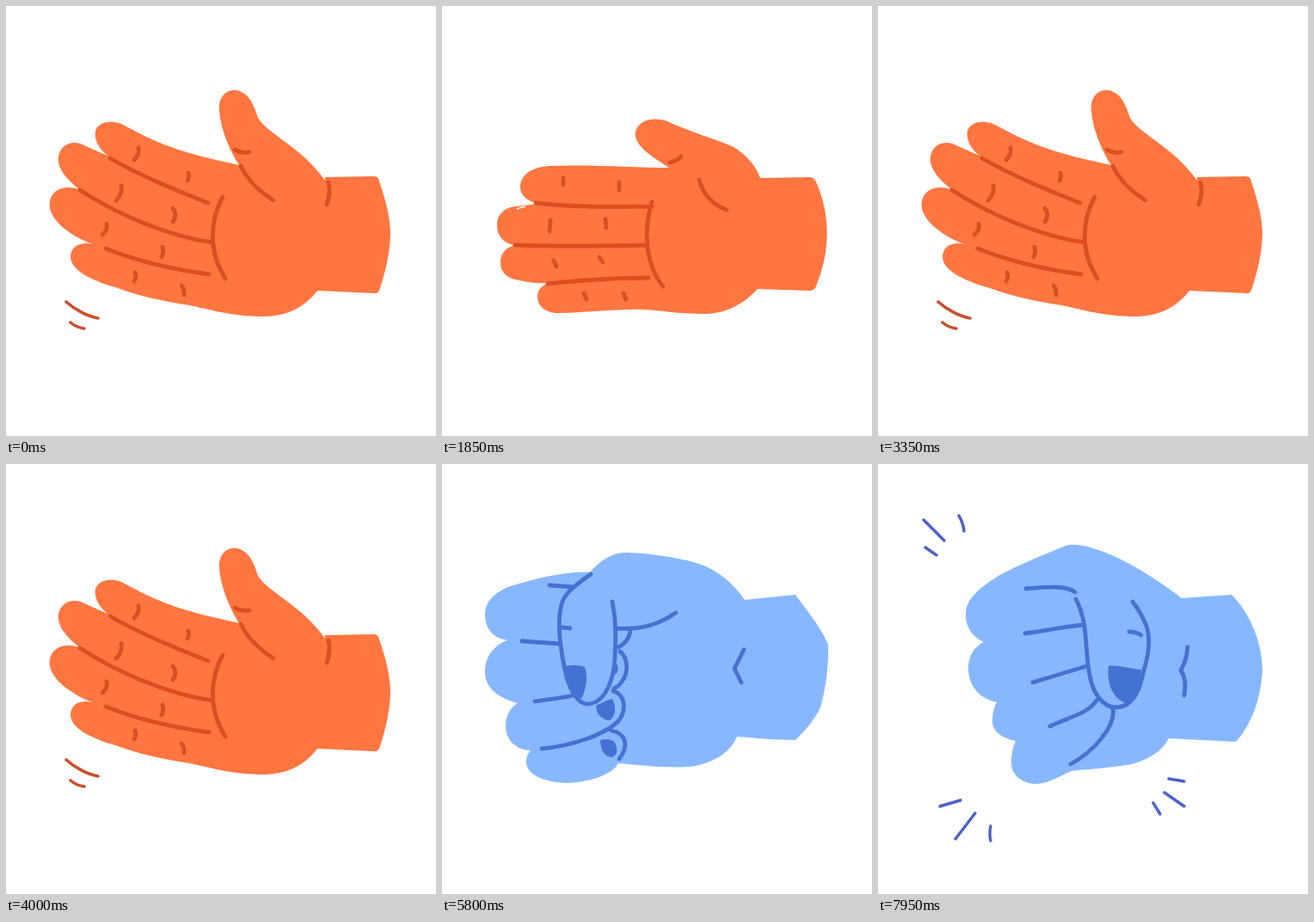
Write an HTML page that moves like this. It is 500 px wide and 500 px high and loops after 8 s.

```html
<!DOCTYPE html>
<html lang="en">
<head>
<meta charset="utf-8">
<title>Hand gestures</title>
<style>
  html, body { margin: 0; width: 100%; height: 100%; overflow: hidden; background: #fff; }
  svg { display: block; width: 100%; height: 100%; }
  g { display: none; }
  .line { fill: none; stroke-width: 4.8; stroke-linecap: round; stroke-linejoin: round; }
  .orange .skin { fill: #ff7640; }
  .orange .line { stroke: #dc4e20; }
  .orange .mark { stroke: #c94f2c; stroke-width: 3.6; }
  .blue .skin { fill: #87b8ff; }
  .blue .line { stroke: #4472d3; }
  .blue .nail { fill: #4472d3; }
  .blue .mark { stroke: #4b63c9; stroke-width: 3.4; }
  .glint { fill: none; stroke: #fff; stroke-width: 1.6; }
</style>
</head>
<body>
<svg viewBox="0 0 500 500">
  <g id="raised" class="orange">
    <path class="skin" d="M371 199L428 198Q433 198 434 204C441 225 447 245 447 266C446 292 440 312 435 328Q433 335 428 334L362 331C350 347 330 361 300 361C260 361 235 352 213 348C180 343 155 337 130 328C95 318 75 306 75 291C76 278 88 274 101 277C73 267 47 246 51 227C54 212 69 208 85 213C70 201 59 188 61 175C64 159 80 155 93 163L118 174C108 166 102 155 104 145C109 133 125 133 136 138C165 154 190 166 240 178L271 185C258 165 247 135 248 115C250 100 262 95 272 99C284 104 288 115 293 130C303 148 345 165 371 203Z"/>
    <path class="line" d="M121 177C155 197 200 215 235 229M86 214C130 243 190 268 240 275M116 282C155 298 200 307 236 312M252 222C237 250 235 285 255 317M266 167Q274 172 283 170M273 186C282 205 297 217 311 226M375 205Q378 217 373 231"/>
    <path class="line" d="M154 165Q156 172 149 179M212 194Q214 198 211 203M134 209Q136 218 128 226M194 235Q200 243 194 251M117 253Q119 260 112 266M182 280Q184 286 181 292M150 310Q152 315 149 320M204 325Q208 330 207 336"/>
    <path class="line mark" d="M70 344C80 353 95 361 107 363M75 368Q82 374 91 375"/>
  </g>
  <g id="level" class="orange">
    <path class="skin" d="M370 200L428 199Q433 199 436 207C452 245 451 285 436 323Q434 331 428 331L367 329C350 347 330 358 305 358C275 358 255 354 235 353C205 352 165 357 135 357C118 357 111 347 111 338C111 330 116 325 124 322C112 323 98 321 90 319C75 317 68 309 68 298C68 287 75 280 86 278C72 277 64 267 64 255C64 242 73 234 86 233L111 230C98 226 91 220 91 210C92 195 106 187 126 186C170 184 225 188 264 188C245 176 222 162 225 146C230 131 248 129 262 134C285 145 310 152 335 162C352 170 366 187 370 200Z"/>
    <path class="line" d="M109 229C150 234 200 234 244 233M85 278C140 280 190 279 238 278M123 323C160 319 200 316 240 316M244 228C234 260 236 300 257 326M299 202C304 220 316 232 331 237M265 182Q274 180 278 175"/>
    <path class="line" d="M141 200V208M206 205V214M126 249L125 262M190 248L191 258M130 296L133 303M183 292L187 298M165 334L168 341M211 334L214 341"/>
    <path class="glint" d="M87 236Q92 234 97 233"/>
  </g>
  <g id="clench" class="blue">
    <path class="skin" d="M352 158L411 152C420 165 440 188 449 210C450 240 444 270 440 283C432 300 420 312 411 321C385 321 360 318 343 317C335 335 320 345 295 351C265 355 230 350 205 348C198 362 170 370 145 371C120 370 98 362 98 346Q98 339 103 333C88 333 74 322 74 305C74 290 82 281 88 278C65 272 50 260 50 242C50 222 62 210 76 205C58 202 50 190 50 175C50 158 65 147 80 142C110 133 145 124 172 126C182 115 195 103 215 103C245 104 280 110 295 115C320 122 340 140 352 158Z"/>
    <path class="line" d="M173 128C160 138 145 147 140 160C133 180 137 210 142 235C147 262 158 280 170 279C190 278 200 250 201 225C202 200 203 185 198 160M201 191C230 193 250 188 272 173M125 141L152 143M93 206L137 209M140 190L149 191M108 276C125 273 145 272 156 268"/>
    <path class="line" d="M219 193C218 203 213 209 205 213M207 218C216 225 217 240 211 250Q207 258 200 261M199 264C213 268 215 285 206 298C190 315 150 328 116 331M197 310C214 313 218 328 206 343M351 216L340 238L348 254"/>
    <path class="nail" d="M140 236C150 233 160 234 166 236C170 247 168 262 162 273C152 268 145 255 140 236ZM201 230C207 236 206 243 198 247ZM179 281C185 278 193 274 198 273C203 283 202 293 195 298C186 298 179 290 179 281ZM184 321C190 319 198 320 201 324C205 332 204 338 198 341C189 341 184 332 184 321Z"/>
  </g>
  <g id="fist" class="blue">
    <path class="skin" d="M353 156L411 152C430 170 447 205 447 240C445 275 433 305 416 323L338 319C330 335 315 343 295 349C265 354 240 355 225 357C205 366 195 372 182 372C160 370 154 355 155 345Q155 334 160 322C142 318 132 310 133 297Q133 287 138 277C115 272 105 255 105 237C105 222 113 212 123 207C108 200 101 188 102 172C104 155 120 143 140 130C165 116 195 105 218 95C232 91 250 98 265 103C300 118 330 138 353 156Z"/>
    <path class="line" d="M172 145C195 143 220 141 229 149M171 197C195 194 215 189 240 187M180 254C200 248 222 241 243 235M200 305C220 295 245 290 254 275M230 157C245 185 240 215 246 245C250 268 262 283 277 283C300 282 306 255 309 240C317 215 316 200 312 188Q306 173 296 160M224 349C250 335 277 305 273 284M292 195Q300 195 306 199M360 213C359 222 358 230 352 240C358 248 358 258 356 269"/>
    <path class="nail" d="M268 235C280 233 295 239 306 239C305 258 298 273 288 278C272 272 266 255 268 235Z"/>
    <path class="line mark" d="M53 65L77 89M94 60Q99 68 100 78M55 97L68 106M72 398L96 391M113 406L90 436M131 421Q129 430 131 438M338 366L356 369M333 382L356 398M320 394L328 407"/>
  </g>
</svg>
<script>
  const LOOP = 8000, HOLD = 500, LEAD = 100, FIST_STEP = 11;
  const poses = ['raised', 'level', 'clench', 'fist'].map(id => document.getElementById(id));

  // Poses alternate on a fixed beat; the open hand gives way to the fist.
  function poseAt(t) {
    const step = Math.floor((t + LEAD) / HOLD);
    if (step < FIST_STEP) return step % 2;
    return step % 2 ? 2 : 3;
  }

  function draw(t) {
    const shown = poseAt(t);
    poses.forEach((pose, i) => { pose.style.display = i === shown ? 'inline' : 'none'; });
  }

  const start = performance.now();
  function tick(now) {
    draw(Math.max(0, now - start) % LOOP);
    requestAnimationFrame(tick);
  }
  draw(0);
  requestAnimationFrame(tick);
</script>
</body>
</html>
```
